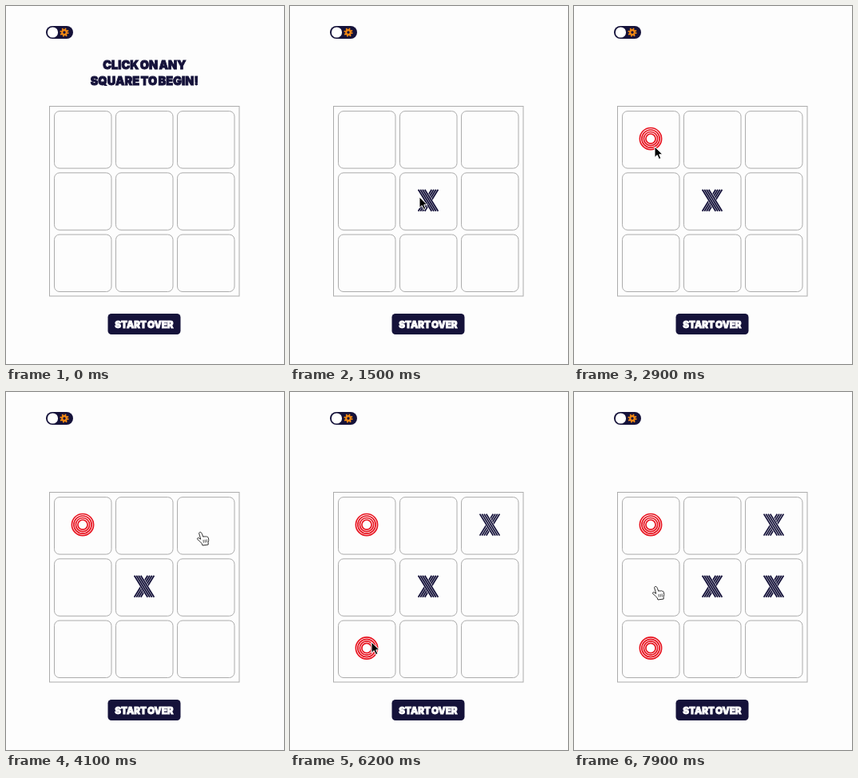
Animation of 348 by 448 pixels, one loop 8 s. Source, as an HTML page:

```html
<!DOCTYPE html>
<html lang="en">
<head>
<meta charset="utf-8">
<title>Tic-tac-toe</title>
<style>
  html, body { margin: 0; width: 100%; height: 100%; overflow: hidden; background: #fdfdfd; }
  svg { display: block; }
  text { font: 900 14.5px Inter, "Open Sans", sans-serif; word-spacing: -1.5px; text-anchor: middle; stroke-width: .8; }
  .navy { fill: #15123a; stroke: #15123a; }
  .box { fill: none; stroke: #acacac; }
</style>
</head>
<body>
<svg width="348" height="448" viewBox="0 0 348 448">
  <defs>
    <g id="X" fill="none" stroke="#15123a" stroke-width="1.8"></g>
    <g id="O" fill="none" stroke="#e8131f" stroke-width="1.7"></g>
  </defs>
  <rect x="50" y="25" width="34" height="16" rx="8" fill="#15123a"/>
  <circle cx="58.5" cy="33" r="6.6" fill="#fff"/>
  <g fill="none" stroke="#f58a14">
    <circle cx="73" cy="33" r="4.6" stroke-width="2" stroke-dasharray="1.8 1.81"/>
    <circle cx="73" cy="33" r="2.8" stroke-width="2.2"/>
  </g>
  <g id="title" class="navy">
    <text x="173.3" y="78.5">CLICK ON ANY</text>
    <text x="173.3" y="99">SQUARE TO BEGIN!</text>
  </g>
  <rect class="box" x="54.5" y="125.5" width="237.5" height="237.5"/>
  <g id="board"></g>
  <rect x="127.5" y="385" width="91" height="26" rx="4.5" fill="#15123a"/>
  <text x="173" y="402.5" fill="#fff" stroke="#fff" style="font-size:11.7px">START OVER</text>
  <g id="cursor">
    <g id="hand" transform="scale(.94)" fill="#fff" stroke="#222" stroke-linejoin="round">
      <path d="M-1.5 .8Q-1 -1 .8 -.6Q2 0 2.4 1.4L4 5.6Q5.5 4.6 6.7 5.4Q8.2 4.5 9 5.6Q10.6 5.2 11 7Q12 10 10.8 13V16L3.2 17Q2.8 14.5 .5 12.5Q-1 11 -3.5 9Q-4.4 7.6 -3 7Q-1.5 6.8 .8 8.8Z"/>
      <path d="M4.2 9.5l.5 4M6.5 9.3l.4 4M8.7 9l.3 4" stroke-width=".8"/>
    </g>
    <path id="arrow" fill="#000" stroke="#fff" d="M0 0V13.5L3.2 10.6L5.4 15.6L7.8 14.6L5.7 9.8H10Z"/>
  </g>
</svg>
<script>
const LOOP = 8000, STEP = 100, COL = 77, ROW = 77.2, SIZE = 71.5, LEFT = 60.5, TOP = 131.6;
const $ = id => document.getElementById(id);

// Four parallel strokes; the falling diagonal covers the rising one.
const strokes = dir => [0, 1, 2, 3].map(k =>
  `M${(-12.4 + 2.7 * k) * dir} -13.5L${(4.3 + 2.7 * k) * dir} 13.5`).join('');
$('X').innerHTML = `<path d="${strokes(-1)}"/>
  <path d="M-13.9 -14H-2.8L13.9 14H2.8Z" fill="#fdfdfd" stroke="none"/><path d="${strokes(1)}"/>`;
$('O').innerHTML = [13.6, 11.1, 8.6, 6.1].map(r => `<circle r="${r}"/>`).join('');

const marks = [[1300, 4, 'X'], [2700, 0, 'O'], [4200, 2, 'X'], [5600, 6, 'O'], [6900, 5, 'X']];
const cellX = i => LEFT + i % 3 * COL;
const cellY = i => TOP + Math.floor(i / 3) * ROW;

let html = '';
for (let i = 0; i < 9; i++)
  html += `<rect class="box" x="${cellX(i)}" y="${cellY(i)}" width="${SIZE}" height="${SIZE}" rx="6.5"/>`;
for (const [, i, kind] of marks)
  html += `<use class="mark" href="#${kind}" x="${cellX(i) + 35.5}" y="${cellY(i) + 34.5}"/>`;
$('board').innerHTML = html;
const markEls = document.querySelectorAll('.mark');

// Cursor moves: start, end, x, y, sideways bend
const moves = [
  [0, 600, 203, 300, 0], [700, 1100, 162, 239, 0], [1800, 2500, 101, 176, 0],
  [3500, 4100, 243, 176, 0], [4800, 5400, 102, 313, 12],
  [6200, 6800, 248, 248, 0], [7300, 7900, 102, 244, 0]
];
const ease = u => u < .5 ? 8 * u ** 4 : 1 - 8 * (1 - u) ** 4;

function cursorAt(t) {
  let x = 349, y = 330;
  for (const [start, end, toX, toY, bend] of moves) {
    if (t <= start) break;
    const p = ease(Math.min(1, (t - start) / (end - start)));
    const dx = toX - x, dy = toY - y;
    const side = bend * Math.sin(Math.PI * p) / Math.hypot(dx, dy);
    x += dx * p + dy * side;
    y += dy * p - dx * side;
  }
  return [x, y];
}

function overFreeCell(x, y, t) {
  for (let i = 0; i < 9; i++) {
    const inside = x >= cellX(i) && x <= cellX(i) + SIZE && y >= cellY(i) && y <= cellY(i) + SIZE;
    if (inside) return !marks.some(([at, cell]) => cell === i && t >= at);
  }
  return false;
}

const show = (el, on) => el.setAttribute('visibility', on ? 'visible' : 'hidden');

function draw(now) {
  const t = Math.floor(now % LOOP / STEP) * STEP;
  const [x, y] = cursorAt(t), free = overFreeCell(x, y, t);
  $('cursor').setAttribute('transform', `translate(${x} ${y})`);
  show($('hand'), free);
  show($('arrow'), !free);
  show($('title'), t < marks[0][0]);
  markEls.forEach((el, i) => show(el, t >= marks[i][0]));
}

const begin = performance.now();
function frame() {
  draw(performance.now() - begin);
  requestAnimationFrame(frame);
}
frame();
</script>
</body>
</html>
```
